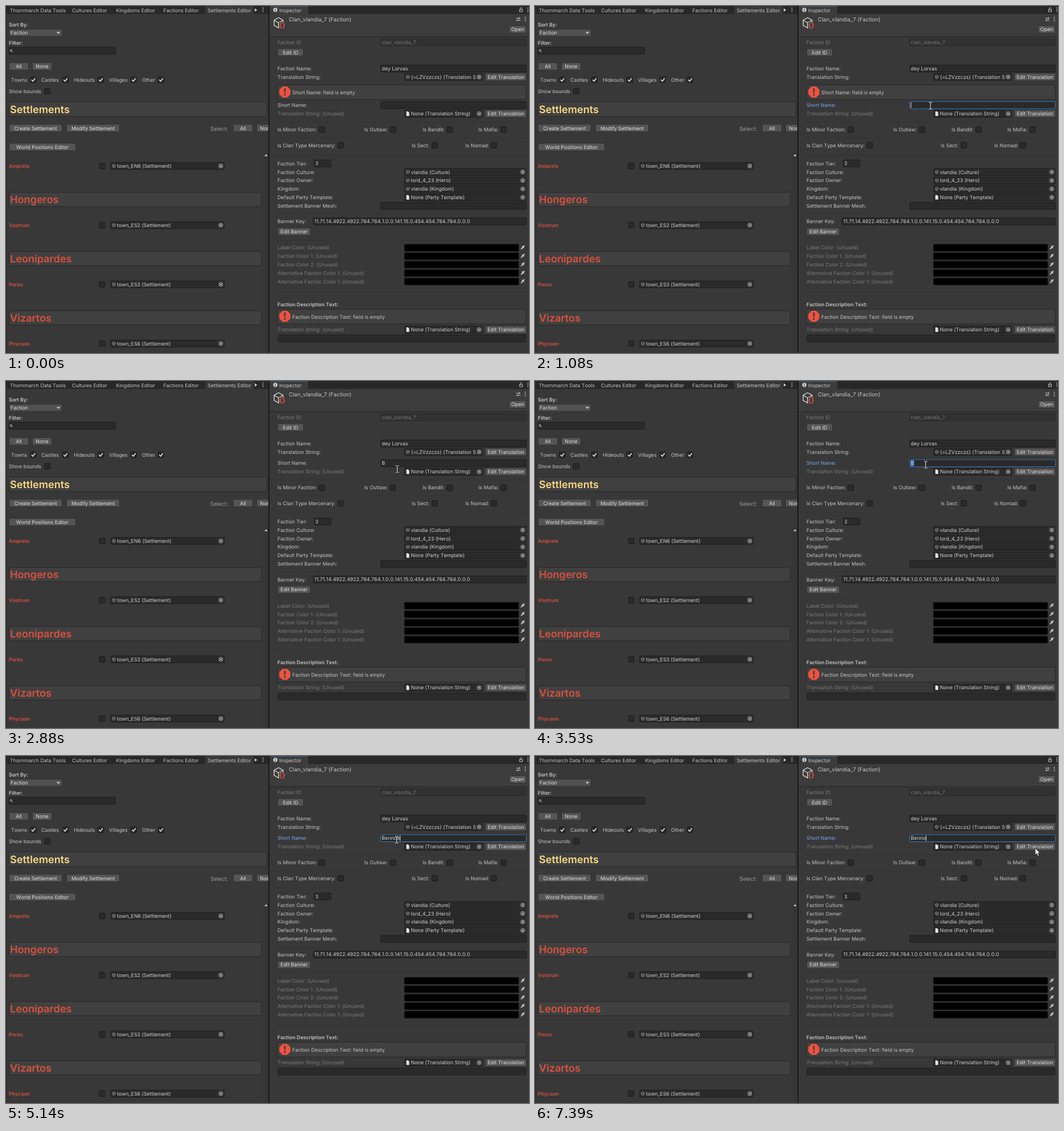
An HTML page for the animation above (8 s loop, 919x609 px).

```html
<!DOCTYPE html>
<html lang="en">
<head>
<meta charset="utf-8">
<title>Inspector</title>
<style>
html, body { margin: 0; width: 100%; height: 100%; overflow: hidden; background: #383838; }
svg { display: block; width: 919px; height: 609px; }
text {
  font: 8.82px Inter, "Open Sans", sans-serif; font-kerning: none;
  font-feature-settings: "calt" 0; text-rendering: geometricPrecision; white-space: pre;
}
.bold { font-weight: 600; }
.head { font-weight: 600; font-size: 18.1px; }
.title { font-size: 9.6px; }
</style>
</head>
<body>
<svg id="stage" viewBox="0 0 919 609"></svg>
<script>
const INK = '#c6c6c6', DIM = '#7c7c7c', RED = '#d9503e', GOLD = '#f8d884', BLUE = '#79a9ee';
const LINE = 13.4;

// Text and controls are placed by the y of their middle line.
const rect = (x, y, w, h, fill, more = '') =>
  `<rect x="${x}" y="${y}" width="${w}" height="${h}" fill="${fill}" ${more}/>`;
const path = (d, fill, more = '') => `<path d="${d}" fill="${fill}" ${more}/>`;
const label = (x, y, s, fill = INK, cls = '', more = '') => {
  const drop = cls === 'head' ? 6.5 : cls === 'title' ? 3.4 : 3.2;
  return `<text x="${x}" y="${y + drop}" fill="${fill}" class="${cls}" ${more}>${s}</text>`;
};
const bold = (x, y, s, fill = INK) => label(x, y, s, fill, 'bold');
const frame = (x, y, w, h, fill, stroke, rx = 1.5, more = '') =>
  rect(x + .5, y + .5, w - 1, h - 1, fill, `stroke="${stroke}" rx="${rx}" ${more}`);
const button = (x, y, w, s) => frame(x, y - 7, w, 14, '#555', '#303030', 2) +
  label(x + w / 2, y, s, '#e2e2e2', '', 'text-anchor="middle"');
const field = (x, y, w, s = '') => frame(x, y - LINE / 2, w, LINE, '#2a2a2a', '#1e1e1e') +
  label(x + 2.3, y, s, '#d0d0d0');
const check = (x, y, on) => frame(x, y - 5.5, 11, 11, '#2a2a2a', '#1a1a1a') +
  (on ? path(`M${x + 2.3} ${y}l2.4 2.6 4.2-5.4`, 'none', 'stroke="#e4e4e4" stroke-width="1.6"') : '');
const cube = (x, y, r, stroke, width) => {
  const a = r * .87, b = r / 2;
  return path(`M${x} ${y - r}l${a} ${b}v${r}l${-a} ${b}l${-a} ${-b}v${-r}zM${x - a} ${y - b}l${a} ${b}l${a} ${-b}M${x} ${y}v${r}`,
    'none', `stroke="${stroke}" stroke-width="${width}"`);
};
const sheet = (x, y) => path(`M${x - 2.5} ${y - 4}h3l2 2v6h-5z`, '#e6e6e6');
const picker = (x, y) => `<circle cx="${x}" cy="${y}" r="3.3" fill="none" stroke="#c4c4c4"/>
  <circle cx="${x}" cy="${y}" r="1.5" fill="#c4c4c4"/>`;
const object = (x, y, w, s) => field(x, y, w) +
  (s.startsWith('None') ? sheet(x + 6, y) : cube(x + 6, y, 3, '#9a9a9a', .8)) +
  label(x + 11.5, y, s, '#d0d0d0') +
  rect(x + w - 12.5, y - 5.7, 11.5, 11.4, '#2f2f2f') + picker(x + w - 6.5, y);
const dots = (x, y) => [-3, 0, 3].map(d => rect(x - .8, y + d - .8, 1.6, 1.6, '#c4c4c4')).join('');
const panel = (x, y, w, h) => frame(x, y, w, h, '#404040', '#272727', 2);
const rule = y => rect(473, y, 442, 1, '#333');
const warning = (y, s) => {
  const r = 9.7, k = 4, c = y - .4;
  return panel(476.5, y - 13.5, 438, 27) +
    path(`M${490 - k} ${c - r}h${2 * k}l${r - k} ${r - k}v${2 * k}l${k - r} ${r - k}h${-2 * k}l${k - r} ${k - r}v${-2 * k}z`, '#f0523f') +
    path(`M488.5 ${c - 6.5}h3l-.5 8.2h-2z`, '#3c3c3c') + rect(488.6, c + 3.2, 2.8, 2.8, '#3c3c3c') +
    label(503, y + .8, s);
};
const translation = (y, s, value, fill) => label(477, y, s, fill) +
  object(700, y, 138, value) + button(842, y, 73, 'Edit Translation');
const dropper = (x, y) => path(`M${x - 3.5} ${y + 4}l.6-2.2 3.6-3.6 1.4 1.4-3.6 3.6z`, '#c4c4c4') +
  path(`M${x - 1.2} ${y - 2}l3.2 3.2M${x + .6} ${y - .6}l2.4-2.4`, 'none', 'stroke="#c4c4c4" stroke-width="2"');

function leftPane() {
  let s = rect(0, 0, 461, 14, '#282828') + rect(350, 0, 85, 14, '#383838') + rect(0, 14, 1.5, 595, '#2c2c2c');
  [[7, 'Thornmarch Data Tools'], [116, 'Cultures Editor'], [193.5, 'Kingdoms Editor'],
   [276.5, 'Factions Editor'], [354.5, 'Settlements Editor']].forEach(([x, n]) => s += label(x, 7.3, n));
  s += path('M437 4l4.5 3-4.5 3z', INK) + dots(451.5, 6.5);
  s += bold(5, 32.5, 'Sort By:') + frame(5, 40.3, 94, LINE, '#515151', '#303030', 2) +
    label(8, 47, 'Faction', '#e0e0e0') + path('M88.5 45.5h7l-3.5 3.5z', INK);
  s += bold(5, 65, 'Filter:') + field(4.5, 78.5, 188.5) +
    '<circle cx="8.7" cy="78" r="1.6" fill="none" stroke="#c4c4c4"/>' + path('M9.8 79.2l2 2', 'none', 'stroke="#c4c4c4"');
  s += button(5, 106, 35, 'All') + button(46, 106, 35, 'None');
  [[9, 42.5, 'Towns'], [62, 99, 'Castles'], [119, 161, 'Hideouts'], [181, 219, 'Villages'], [239, 267, 'Other']]
    .forEach(([x, c, n]) => s += label(x, 129.5, n) + check(c, 129.5, true));
  s += label(5, 149.7, 'Show bounds') + check(67, 149.7);
  s += panel(4, 168, 455, 26.5) + label(7, 181.3, 'Settlements', GOLD, 'head');
  s += button(5, 214.3, 94, 'Create Settlement') + button(106, 214.3, 94, 'Modify Settlement') +
    label(359, 215.5, 'Select:', '#9c9c9c', 'title') + button(399, 214.3, 35, 'All') + button(440, 214.3, 35, 'None');
  s += button(5, 247.5, 118, 'World Positions Editor');
  s += rect(452, 257, 9, 352, '#353535') + path('M454 263.5h6l-3-3.5z', INK);
  [['Amprela', 'EN6'], ['Vostrum', 'ES2'], ['Poros', 'ES3'], ['Phycaon', 'ES6']].forEach(([n, id], i) => {
    const y = 280.7 + i * 103.9;
    s += bold(5, y, n, RED) + check(163.5, y) + object(183.5, y, 200.5, `town_${id} (Settlement)`);
  });
  ['Hongeros', 'Leonipardes', 'Vizartos'].forEach((n, i) => {
    const y = 339.5 + i * 103.9;
    s += panel(4.5, y - 13, 445, 26) + label(7, y, n, RED, 'head');
  });
  return s;
}

function inspectorTop() {
  let s = rect(461, 0, 458, 609, '#383838') + rect(461, 0, 2, 609, '#191919') +
    rect(463, 0, 456, 14, '#282828') + rect(463, 0, 68, 14, '#3c3c3c') + rect(463, 0, 68, 1, '#2c5d87') +
    rect(463, 14, 456, 40, '#3c3c3c') + rect(463, 53.5, 456, 1, '#222');
  s += '<circle cx="473.3" cy="6.7" r="3.7" fill="#d0d0d0"/>' + rect(472.7, 6, 1.2, 3, '#333') + rect(472.7, 4, 1.2, 1.2, '#333');
  s += label(480, 7.3, 'Inspector') + dots(917, 6.5);
  s += frame(902, 5.8, 6, 4.6, 'none', '#c4c4c4', 0) + path('M903.5 6v-1.3a1.6 1.6 0 0 1 3.2 0', 'none', 'stroke="#c4c4c4"');
  s += cube(479, 29.5, 9, '#d6d6d6', 1.4) + rect(480, 28.5, 12, 12, '#3c3c3c') +
    label(480, 34.5, '{}', '#f0523f', 'bold', 'style="font-size:12px"');
  s += label(497, 23.5, 'Clan_vlandia_7 (Faction)', INK, 'title') + dots(912.5, 23) +
    path('M896.5 21.3h7.5M896.5 25h7.5M902 19.5v3.6M899 23.2v3.6', 'none', 'stroke="#c4c4c4"');
  s += button(883.5, 41, 31, 'Open');
  s += label(477, 63.7, 'Faction ID', DIM) + frame(658, 57, 257, LINE, '#313131', '#2b2b2b') +
    label(660.3, 63.7, 'clan_vlandia_7', '#777') + button(477, 81.3, 46, 'Edit ID');
  s += label(477, 109.7, 'Faction Name:') + field(658, 109.7, 257, 'dey Lorvas') +
    translation(124.5, 'Translation String:', '{=LZVzzczs} (Translation S');
  return s;
}

function inspectorBody() {
  let s = label(477, 174, 'Short Name:', INK, '', 'id="name"') + field(658, 174, 257) +
    frame(658, 174 - LINE / 2, 257, LINE, 'none', '#3a79bb', 1.5, 'id="ring"') +
    rect(660, 168.8, 6, 10.4, '#3a76c4', 'id="pick"') + label(660.3, 174, '', '#d6d6d6', '', 'id="typed"') +
    rect(660, 169, 1, 10, '#e0e0e0', 'id="caret"');
  s += translation(189, 'Translation String: (Unused)', 'None (Translation String)', DIM);
  [203, 230.5, 260.5, 364.5, 410.5, 502].forEach(y => s += rule(y));
  [[477, 549.5, 217, 'Is Minor Faction:'], [629.5, 674.5, 217, 'Is Outlaw:'], [732, 774, 217, 'Is Bandit:'],
   [830, 869, 217, 'Is Mafia:'], [477, 582.5, 244.3, 'Is Clan Type Mercenary:'], [713, 748, 244.3, 'Is Sect:'],
   [807, 851.5, 244.3, 'Is Nomad:']].forEach(([x, c, y, n]) => s += label(x, y, n) + check(c, y));
  s += label(477, 276.5, 'Faction Tier:') + field(541, 276.2, 30.5, '3');
  [['Faction Culture:', 'vlandia (Culture)'], ['Faction Owner:', 'lord_4_23 (Hero)'], ['Kingdom:', 'vlandia (Kingdom)'],
   ['Default Party Template:', 'None (Party Template)']].forEach(([n, v], i) => {
    const y = 291.3 + i * 14.85;
    s += label(477, y, n) + object(700, y, 214.5, v);
  });
  s += label(477, 350.7, 'Settlement Banner Mesh:') + field(658, 350.7, 257);
  s += label(477, 378.2, 'Banner Key:') +
    field(539.5, 378, 375.5, '11.71.14.4922.4922.764.764.1.0.0.141.15.0.454.454.764.764.0.0.0') + button(477, 396, 58.5, 'Edit Banner');
  ['Label Color', 'Faction Color 1', 'Faction Color 2', 'Alternative Faction Color 1', 'Alternative Faction Color 1'].forEach((n, i) => {
    const y = 424.2 + i * 14.85;
    s += label(477, y, n + ': (Unused)', DIM) + frame(699.5, y - LINE / 2, 202, LINE, '#000', '#1e1e1e') + dropper(908, y - .7);
  });
  s += bold(477, 523.5, 'Faction Description Text:') + warning(545, 'Faction Description Text: field is empty') +
    translation(568, 'Translation String: (Unused)', 'None (Translation String)', DIM) + field(477.5, 583.3, 436.5);
  return s;
}

const I_BEAM = 'M-3 -6h2l1 1 1-1h2M0 -5v10M-3 6h2l1-1 1 1h2';
const stage = document.getElementById('stage');
stage.innerHTML = rect(0, 0, 919, 609, '#383838') + leftPane() + inspectorTop() +
  `<g id="alert">${warning(151.3, 'Short Name: field is empty')}</g><g id="body">${inspectorBody()}</g>` +
  '<g id="beam">' + path(I_BEAM, 'none', 'stroke="#222" stroke-width="2"') +
  path(I_BEAM, 'none', 'stroke="#f2f2f2" stroke-width="1"') + '</g>' +
  path('M0 0v11.3l2.6-2.4 2 4.5 2-.9-2-4.3h3.5z', '#fff', 'id="arrow" stroke="#222" stroke-width=".7"');

const get = id => document.getElementById(id);
const [name, ring, pick, typed, caret, alertBox, body, beam, arrow] =
  ['name', 'ring', 'pick', 'typed', 'caret', 'alert', 'body', 'beam', 'arrow'].map(get);
const show = (el, on) => el.setAttribute('visibility', on ? 'visible' : 'hidden');
const place = (el, x, y) => el.setAttribute('transform', `translate(${x} ${y})`);

// Position after the latest of n hops, one every 77 ms.
function glide(t, start, n, x0, y0, x1, y1) {
  const p = Math.min(1, (Math.floor((t - start) / 77) + 1) / n), e = p * p * (3 - 2 * p);
  return [x0 + (x1 - x0) * e, y0 + (y1 - y0) * e];
}

function pointer(t) {
  if (t < 300 || (t >= 5770 && t < 6070)) return null;
  if (t < 2730) return glide(t, 300, 10, 722, 556, 695, 175);
  if (t < 3110) return glide(t, 2730, 4, 695, 175, 680, 134);
  if (t < 3280) return [677, 138];
  if (t < 3530) return glide(t, 3280, 2, 677, 138, 684, 147);
  if (t < 5770) return [686.5, 147];
  if (t < 6930) return glide(t, 6070, 3, 903, 157, 866, 179);
  return glide(t, 6930, 6, 866, 179, 879, 162);
}

const WORD = 'Bennoe', KEYS = [4070, 4360, 4530, 4680, 4820, 5140];
function entry(t) {
  if (t < 2340) return '';
  if (t < KEYS[0]) return WORD[0];
  return WORD.slice(0, t < 7160 ? KEYS.filter(k => t >= k).length : 5);
}

function draw(now) {
  const t = now % 8000, filled = t >= 2340;
  const focus = (t >= 1080 && !filled) || t >= 2960, selected = t >= 3110 && t < 4070;
  show(alertBox, !filled);
  place(body, 0, filled ? -29.7 : 0);
  name.setAttribute('fill', focus ? BLUE : INK);
  typed.textContent = entry(t);
  const width = typed.textContent ? typed.getComputedTextLength() : 0;
  show(ring, focus);
  show(pick, selected);
  pick.setAttribute('width', width + .5);
  show(caret, focus && !selected);
  caret.setAttribute('x', 660.2 + width);

  const at = pointer(t), overField = t > 900 && t < 5770;
  show(beam, at && overField);
  show(arrow, at && !overField);
  if (at) place(overField ? beam : arrow, ...at);
}

const begin = performance.now();
function tick() {
  draw(performance.now() - begin);
  requestAnimationFrame(tick);
}
tick();
</script>
</body>
</html>
```
